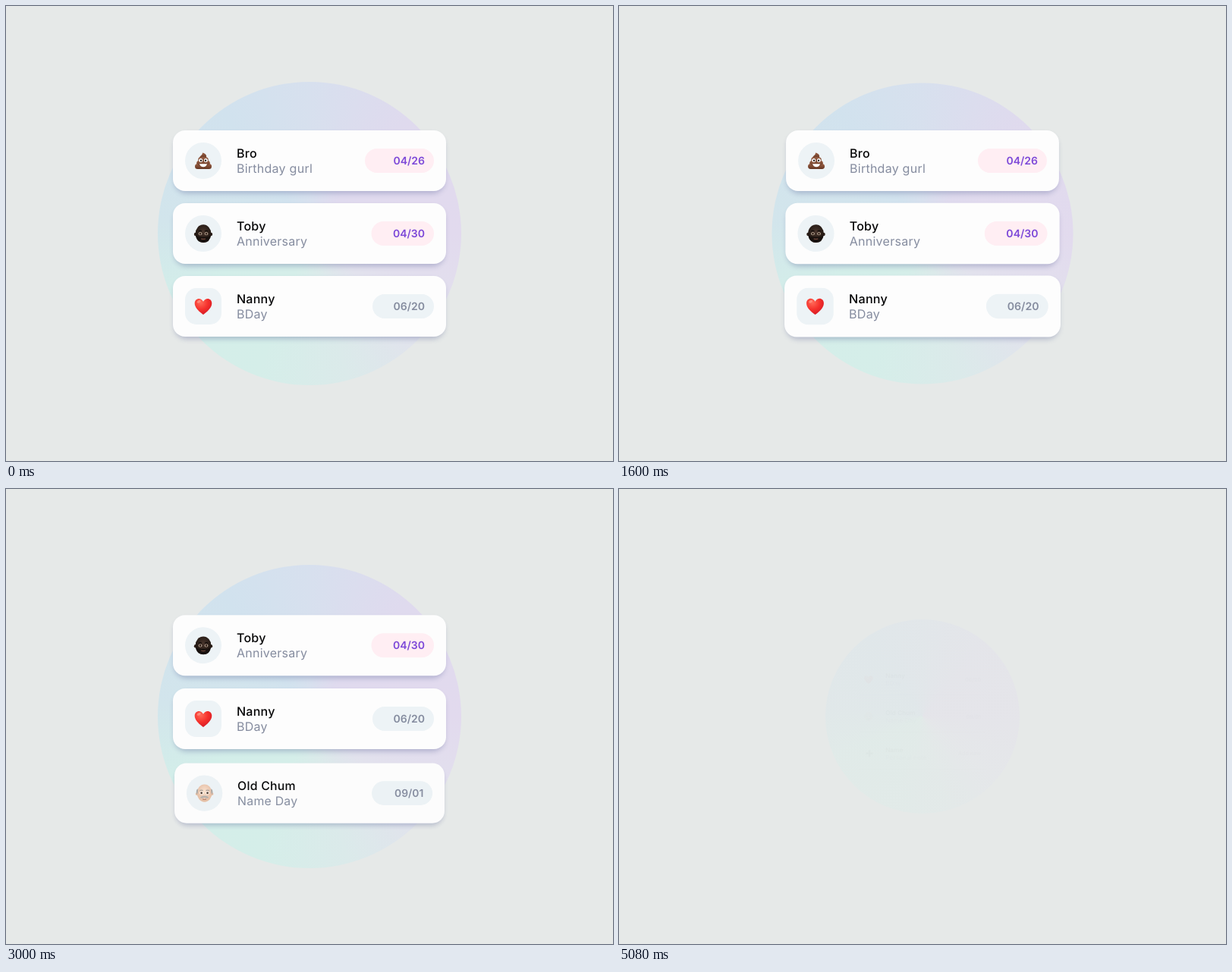
Animation of 800 by 600 pixels, one loop 5.76 s. Source, as an HTML page:

```html
<!DOCTYPE html>
<html lang="en">
<head>
<meta charset="utf-8">
<title>Upcoming dates</title>
<style>
  html, body { margin: 0; width: 100%; height: 100%; overflow: hidden; background: #e6e9e8; }
  #disc {
    position: absolute; left: 200px; top: 100px; width: 400px; height: 400px; border-radius: 50%;
    background: conic-gradient(#d7e0ee, #dfdaee 40deg, #e2daee 90deg, #e2e2ed 130deg,
      #dbeaea 165deg, #d5eee9 200deg, #d3eee9 245deg, #d2e5ec 275deg, #d1e2ee 325deg, #d7e0ee);
  }
  svg { position: absolute; left: 0; top: 0; display: block; }
  text { font-family: Inter, "Open Sans", sans-serif; text-rendering: geometricPrecision; }
  .name { font-size: 16px; font-weight: 500; letter-spacing: .25px; fill: #050506; }
  .note { font-size: 16px; letter-spacing: .25px; fill: #858c9f; }
  .date { font-size: 14px; font-weight: 600; text-anchor: end; }
</style>
</head>
<body>
<div id="disc"></div>
<svg width="800" height="600" viewBox="0 0 800 600">
  <defs>
    <filter id="soft" x="-10%" y="-30%" width="120%" height="160%"><feGaussianBlur stdDeviation="3.5"/></filter>
    <radialGradient id="red" cx=".35" cy=".25" r=".85">
      <stop offset="0" stop-color="#ff6a58"/><stop offset=".5" stop-color="#f5312c"/><stop offset="1" stop-color="#cf1524"/>
    </radialGradient>
    <linearGradient id="brown" x2="0" y2="1">
      <stop offset="0" stop-color="#9a6045"/><stop offset="1" stop-color="#643522"/>
    </linearGradient>
    <radialGradient id="dark" cy=".4"><stop offset="0" stop-color="#49362d"/><stop offset="1" stop-color="#221813"/></radialGradient>
    <radialGradient id="pale" cy=".4"><stop offset="0" stop-color="#fbe3d0"/><stop offset="1" stop-color="#e6bfa5"/></radialGradient>
  </defs>
  <g id="list"></g>
</svg>
<script>
const LOOP = 5760;
const GRAY = { pill: '#edf3f6', ink: '#858c9f' };
const PINK = { pill: '#ffeef3', ink: '#7d49d8' };

const eyes = (y, white, iris) => [-4, 4].map(x =>
  `<ellipse cx="${x}" cy="${y}" rx="2.3" ry="2" fill="${white}"/><circle cx="${x}" cy="${y}" r="1.4" fill="${iris}"/>`).join('');

const icons = {
  swirl: `<g fill="url(#brown)">
      <path d="M-1-10.5C4-9.5 5-6 3.5-3.5H-4.5C-6-6-1-6.5-1-10.5Z"/>
      <rect x="-6.7" y="-4.8" width="13.4" height="7" rx="3.5"/>
      <rect x="-8.8" y="-.2" width="17.6" height="7.2" rx="3.6"/>
      <rect x="-11" y="4" width="22" height="7" rx="3.5"/></g>
    <path d="M-7.5 4.8Q0 7.8 7.5 4.5M-5.5.1Q0 2 5.5-.2" fill="none" stroke="#58301f" stroke-width=".7"/>
    <g fill="#fff"><circle cx="-3.3" cy="-.4" r="2.5"/><circle cx="3.3" cy="-.4" r="2.5"/>
      <path d="M-5 4.2H5Q3.8 8.2 0 8.2T-5 4.2Z"/></g>
    <g fill="#2a1a14"><circle cx="-3" cy="-.3" r="1.2"/><circle cx="3" cy="-.3" r="1.2"/></g>`,
  young: `<g fill="#2c1f19"><circle cx="-10" cy="1" r="2.2"/><circle cx="10" cy="1" r="2.2"/></g>
    <ellipse rx="10.3" ry="11.8" fill="url(#dark)"/>
    <path d="M-10 2Q-9 12 0 12T10 2Q7 5 4 4.5H-4Q-7 5-10 2Z" fill="#18110e"/>
    ${eyes(.3, '#c9b7a4', '#33211a')}
    <path d="M-6.3-3Q-4-4.2-2-3M2-3Q4-4.2 6.3-3" fill="none" stroke="#120c0a" stroke-width="1.2"/>
    <path d="M-2.8 6.8Q0 8 2.8 6.8" fill="none" stroke="#70483c" stroke-width="1.3"/>`,
  heart: `<path d="M0 11C-4 8-11.3 2.5-11.3-4C-11.3-11-3-12.3 0-6.3C3-12.3 11.3-11 11.3-4C11.3 2.5 4 8 0 11Z" fill="url(#red)"/>
    <ellipse cx="-5.8" cy="-6.2" rx="2.6" ry="1.6" fill="#ff9c8d" opacity=".7" transform="rotate(-30 -5.8 -6.2)"/>`,
  old: `<g fill="#e5bea5"><circle cx="-10" cy="1" r="2"/><circle cx="10" cy="1" r="2"/></g>
    <ellipse rx="10" ry="11.8" fill="url(#pale)"/>
    <path d="M-9-6Q-12.2-4-10.2 2Q-8-1-9-6ZM9-6Q12.2-4 10.2 2Q8-1 9-6Z" fill="#aaa9a7"/>
    ${eyes(-.3, '#fff', '#4a3426')}
    <path d="M-6.3-3.5Q-4-4.6-2-3.5M2-3.5Q4-4.6 6.3-3.5" fill="none" stroke="#aaa39d" stroke-width="1.2"/>
    <path d="M0 3.5Q5 3.3 5.5 6.4Q2 7 0 5.8Q-2 7-5.5 6.4Q-5 3.3 0 3.5Z" fill="#b5b0ab"/>
    <path d="M-2.5 8Q0 9 2.5 8" fill="none" stroke="#a8715f"/>`,
  plus: '<path d="M2-9V9M-7 0H11" stroke="#45464a" stroke-width="4.6"/>'
};

const people = [
  { name: 'Bro', note: 'Birthday gurl', date: '04/26', icon: 'swirl', left: 73, look: PINK },
  { name: 'Toby', note: 'Anniversary', date: '04/30', icon: 'young', left: 81.5, look: PINK },
  { name: 'Nanny', note: 'BDay', date: '06/20', icon: 'heart', left: 83, look: GRAY, round: 15 },
  { name: 'Old Chum', note: 'Name Day', date: '09/01', icon: 'old', left: 83, look: GRAY },
  { name: 'Name', note: 'Personal note', date: 'Add new', icon: 'plus', left: 83, look: GRAY }
];

const list = document.getElementById('list');
const disc = document.getElementById('disc');

list.innerHTML = people.map(p => `<g>
  <rect x="-178" y="-35" width="356" height="78" rx="16" fill="#3c4884" opacity=".3" filter="url(#soft)"/>
  <rect x="-180" y="-40" width="360" height="80" rx="16" fill="#fdfdfd"/>
  <rect x="-164" y="-24" width="48" height="48" rx="${p.round || 24}" fill="#edf3f6"/>
  <g transform="translate(-140 0)">${icons[p.icon]}</g>
  <text class="name" x="-96" y="-4">${p.name}</text>
  <text class="note" x="-96" y="16">${p.note}</text>
  <rect x="${p.left}" y="-16" width="${164 - p.left}" height="32" rx="16" fill="${p.look.pill}"/>
  <text class="date" x="152" y="5" fill="${p.look.ink}">${p.date}</text>
</g>`).join('');
const cards = [...list.children];

const clamp = x => Math.max(0, Math.min(1, x));
const mix = (a, b, p) => a + (b - a) * p;
const easeOut = x => 1 - (1 - clamp(x)) ** 3;
const easeInOut = x => { x = clamp(x); return x * x * (3 - 2 * x); };

function spring(ms) {
  if (ms <= 0) return 0;
  const t = ms / 1000, damp = 8.4, freq = 8.57;
  return 1 - Math.exp(-damp * t) * (Math.cos(freq * t) + damp / freq * Math.sin(freq * t));
}

function settle(ms) {
  const x = Math.max(0, ms) * .0094;
  return 1 - (1 + x) * Math.exp(-x);
}

// Times of the phases, in ms
const ZOOM_OUT = 510, RETURN = 860, SCROLLS = [2570, 3570], CLOSE = 4755, FADE = 350;
const ENTER = [942, 1033, 1108];
const slotY = slot => [85, 204, 300, 396, 515][slot + 1];

function cardPose(i, t) {
  let slot = i, y = null, scale = 1, alpha = 1;
  for (const start of SCROLLS) {
    if (t < start) break;
    const ms = t - start;
    const lag = Math.max(0, slot - 1) * 20;
    if (slot >= 0 && slot <= 3) {
      y = mix(slotY(slot), slotY(slot - 1), easeOut((ms - lag) / 600));
      scale = alpha = 1;
      if (slot === 0) {
        const p = easeInOut(ms / FADE);
        scale = 1 + p / 2;
        alpha = 1 - p;
      } else if (slot === 3) {
        alpha = easeOut(ms / 600);
        scale = .5 + alpha / 2;
      }
    }
    slot--;
  }
  if (y === null) {
    if (i > 2) return { y: 0, scale: 1, alpha: 0 };
    y = slotY(i);
  }
  if (t >= RETURN && t < SCROLLS[0]) {
    const p = spring(t - ENTER[i]);
    scale = .5 + p / 2;
    alpha = clamp(p);
  }
  return { y, scale, alpha };
}

function draw(t) {
  let zoom = 1, alpha = 1, discZoom = 1, discAlpha = 1;
  if (t < RETURN) {
    const p = easeInOut((t - ZOOM_OUT) / FADE);
    zoom = discZoom = 1 + p / 2;
    alpha = discAlpha = 1 - p;
  } else if (t < CLOSE) {
    discAlpha = settle(t - ENTER[0]);
    discZoom = .5 + discAlpha / 2;
  } else {
    const p = easeInOut((t - CLOSE) / FADE);
    zoom = 1 - p / 2;
    alpha = 1 - p;
    // the disc stops short and stays faintly visible
    const q = Math.min(p, .72);
    discZoom = 1 - q / 2;
    discAlpha = 1 - q;
  }
  disc.style.transform = `scale(${discZoom})`;
  disc.style.opacity = discAlpha;
  list.setAttribute('transform', `translate(400 300) scale(${zoom}) translate(-400 -300)`);
  list.setAttribute('opacity', alpha);
  cards.forEach((card, i) => {
    const pose = cardPose(i, t);
    card.setAttribute('transform', `translate(400 ${pose.y}) scale(${pose.scale})`);
    card.setAttribute('opacity', pose.alpha);
    card.setAttribute('visibility', pose.alpha > .002 ? 'visible' : 'hidden');
  });
}

let begin = null;
function tick(now) {
  if (begin === null) begin = now;
  draw((now - begin) % LOOP);
  requestAnimationFrame(tick);
}
draw(0);
requestAnimationFrame(tick);
</script>
</body>
</html>
```
